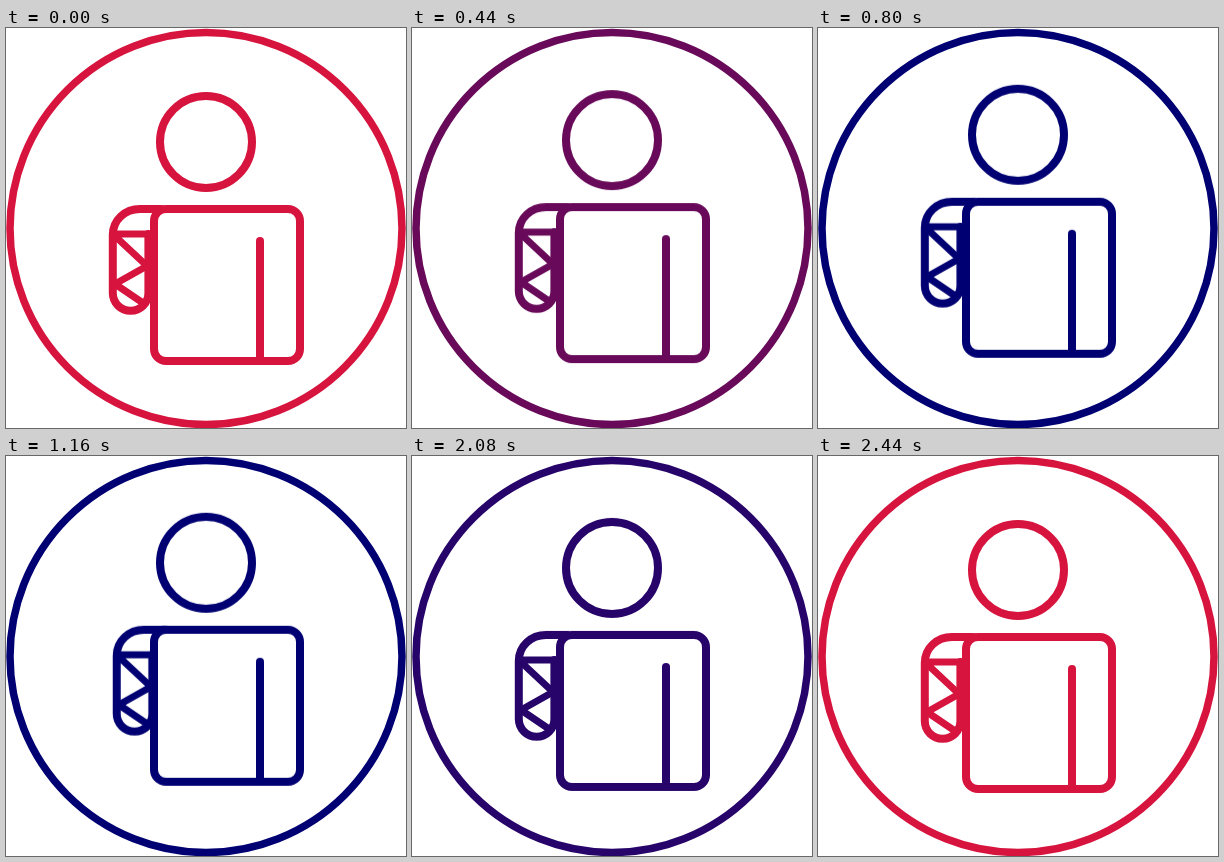
Recreate the animation shown at these times as an HTML page without scripts. Size 400 by 400 pixels, loop 2640 ms.

```html
<!DOCTYPE html>
<html lang="en">
<head>
<meta charset="utf-8">
<title>Arm in bandage icon</title>
<style>
  :root {
    --red: #d6143e;
    --navy: #000073;
    --ease: cubic-bezier(.333, 0, .667, 1);
  }
  html, body {
    margin: 0;
    width: 100%;
    height: 100%;
    overflow: hidden;
    background: #fff;
  }
  svg {
    display: block;
    width: 100%;
    height: 100%;
    fill: none;
    stroke: currentColor;
    stroke-width: 8;
    stroke-linecap: round;
    stroke-linejoin: round;
    animation: tint 2640ms linear infinite;
  }
  .person { animation: lift 2640ms var(--ease) infinite; }
  .arm { animation: tuck 2640ms var(--ease) infinite; }
  .wrap { stroke-width: 7; }
  .torso { fill: #fff; }

  @keyframes tint {
    0%, 7% { color: var(--red); }
    25.9%, 75.76% { color: var(--navy); }
    92.42%, 100% { color: var(--red); }
  }
  @keyframes lift {
    0%, 9.85% { transform: translateY(0); }
    30.3%, 65.72% { transform: translateY(-7.2px); }
    85.98%, 100% { transform: translateY(0); }
  }
  @keyframes tuck {
    0%, 29.81% { transform: translateX(0); }
    50% { transform: translateX(5px); }
    70.19%, 100% { transform: translateX(0); }
  }
</style>
</head>
<body>
<svg viewBox="0 0 400 400">
  <circle cx="200" cy="200.5" r="196" stroke-width="7.5"/>
  <g class="person">
    <circle cx="200" cy="114" r="46"/>
    <g class="arm">
      <path d="M155 181H134C119 181 106.800 192 106.800 207V265a17.800 17.800 0 0 0 35.600 0V206"/>
      <path class="wrap" d="M107 206H142M110 209L141 238L109 256L137 275"/>
    </g>
    <rect class="torso" x="148" y="181" width="146" height="152" rx="12"/>
    <path d="M254 213V333"/>
  </g>
</svg>
</body>
</html>
```
